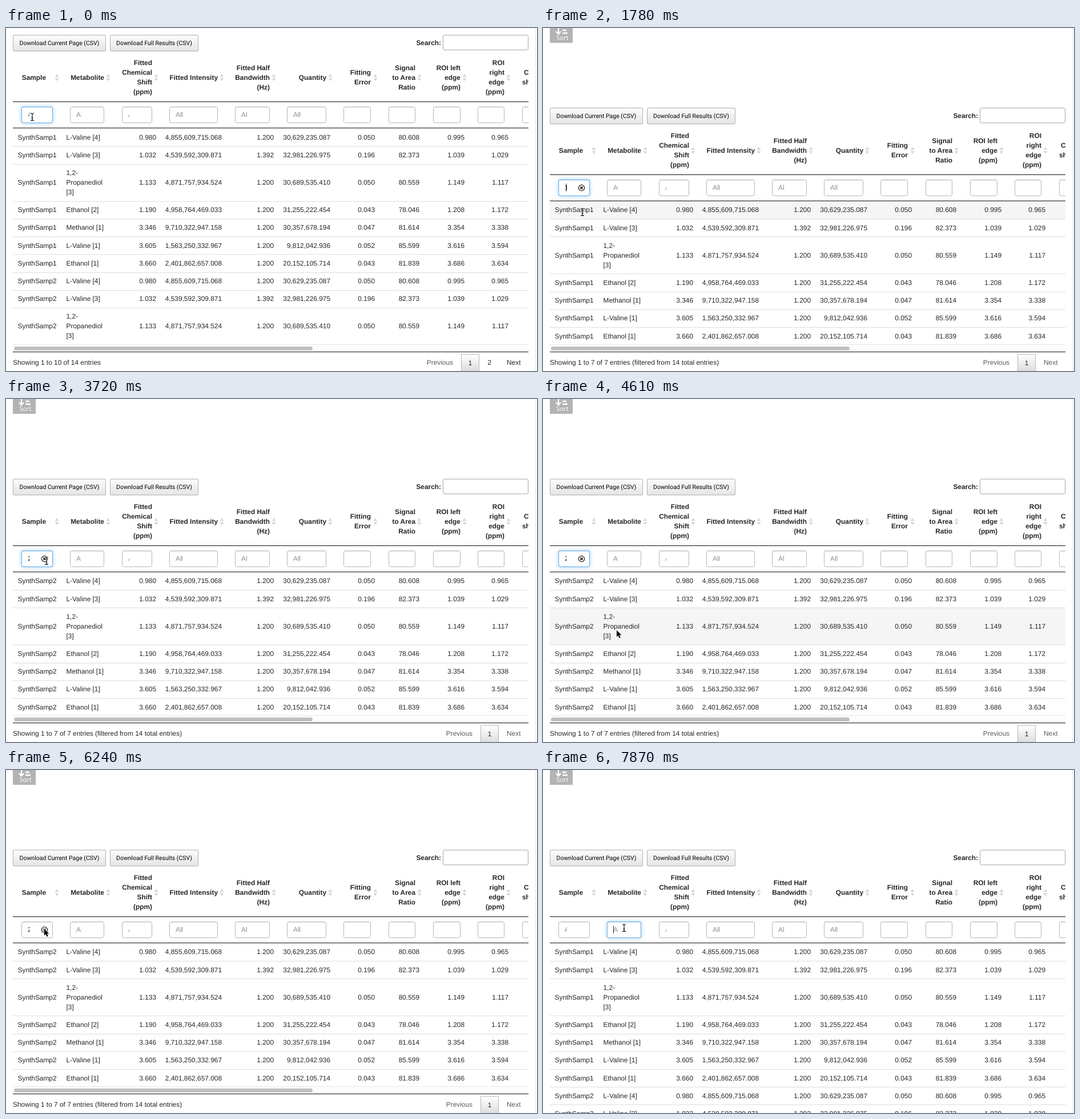
An HTML page for the animation above (8 s loop, 930 by 602 pixels).

```html
<!DOCTYPE html>
<html lang="en">
<head>
<meta charset="utf-8">
<title>Filtering a results table</title>
<style>
html, body { margin: 0; width: 100%; height: 100%; overflow: hidden; background: #fff; }
body { position: relative; font: 11.9px/17px "Liberation Sans", Arial, sans-serif; color: #262626;
  text-rendering: geometricPrecision; }
div, svg { position: absolute; box-sizing: border-box; }
#stage { left: 0; top: 0; width: 930px; height: 602px; overflow: hidden; }
#page { left: 0; top: 0; width: 930px; height: 900px; }
#edge { left: 927px; top: 0; width: 1px; height: 602px; background: #e6e6e6; }
.text { white-space: pre; }
.bold { font-weight: bold; }
.dim { color: #5a5a5a; }
#sort { left: 12px; top: -14px; width: 40px; height: 40px; background: #b3b3b3; }
#sort .text { font: 11px/17px "Open Sans", sans-serif; color: #fff; }
.button { top: 140px; height: 29px; border: 1px solid #b0b0b0; border-radius: 2px; color: #000;
  font: 10.5px/27px Roboto, sans-serif; text-align: center; white-space: nowrap;
  background: linear-gradient(#fcfcfc, #e5e5e5); }
.button.hover { border-color: #666; background: linear-gradient(#f5f5f5, #dfdfdf); }
#search { left: 765px; top: 140px; width: 150px; height: 27px; border: 1px solid #aaa; border-radius: 3px; }
#table { left: 12px; top: 0; width: 903px; height: 900px; overflow: hidden; }
#table > .shift { left: -12px; top: 0; width: 930px; height: 900px; }
.rule { left: 12px; width: 903px; height: 1px; background: #111; }
.field { top: 266px; height: 29px; border: 1px solid #b6b6b6; border-radius: 3.4px;
  box-shadow: inset 0 1px 1px rgba(0,0,0,.075); }
.field .value { left: 10px; top: 5px; height: 17px; overflow: hidden; color: #8e8e8e; }
.field .value.typed { color: #333; }
.glow { inset: -1px; border: 1px solid #66afe9; border-radius: 3.4px; box-shadow: 0 0 7px rgba(102,175,233,.6); }
.caret { top: 6px; width: 1px; height: 14px; background: #333; }
#rows { left: 0; top: 303.9px; width: 930px; }
.row { position: relative; left: 12px; width: 903px; border-top: 1px solid #ddd; }
.row.first { border-top-color: transparent; }
.row.hover { background: #f5f5f5; }
.row .text { margin-left: -12px; }
#foot { position: relative; height: 60px; }
#track { left: 12px; top: -1px; width: 903px; height: 13px; border-top: 1px solid #e8e8e8; background: #fdfdfd; }
#thumb { left: 14px; top: 2.6px; width: 523px; height: 7px; border-radius: 4px; background: #c1c1c1; }
#current { top: 15.6px; width: 32px; height: 32px; border: 1px solid #b5b5b5; border-radius: 2px;
  background: linear-gradient(#fff, #dcdcdc); text-align: center; line-height: 30px; }
#cursor { left: 0; top: 0; overflow: visible; width: 1px; height: 1px; }
</style>
</head>
<body>
<div id="stage">
  <div id="page">
    <div id="sort">
      <svg width="40" height="26" fill="none" stroke="#fff" stroke-width="2.300">
        <path d="M15 8V24M11 20L15 24.500L19 20M22 8H25M22 13H27M22 18H29M22 23H31"/>
      </svg>
    </div>
    <div class="button" id="download" style="left:12px;width:163px">Download Current Page (CSV)</div>
    <div class="button" style="left:182px;width:155px">Download Full Results (CSV)</div>
    <div id="search"></div>
    <div id="table"><div class="shift">
      <div class="rule" style="top:257px"></div>
      <div id="rows"><div id="foot">
        <div id="track"></div><div id="thumb"></div>
        <div class="rule" style="top:12px"></div>
        <div id="current">1</div>
      </div></div>
      <div class="rule" style="top:303px"></div>
    </div></div>
  </div>
  <div id="edge"></div>
  <svg id="cursor">
    <defs><path id="stem" d="M-3 -6.500Q0 -6.500 0 -4.500Q0 -6.500 3 -6.500M0 -4.500V4.500M-1.500 2H1.500M-3 6.500Q0 6.500 0 4.500Q0 6.500 3 6.500"/></defs>
    <g id="beam" fill="none">
      <use href="#stem" stroke="#fff" stroke-width="2.400"/>
      <use href="#stem" stroke="#000" stroke-width="1.100"/>
    </g>
    <path id="arrow" d="M0 0V11.500L2.700 9L4.600 13.400L6.700 12.500L4.800 8.200H8.400Z" fill="#000" stroke="#fff" stroke-width="1" paint-order="stroke"/>
    <g id="hand" fill="#fff" stroke="#000" stroke-width="1.1" stroke-linejoin="round">
      <path d="M-3 1V-6Q-3 -7.200 -2 -7.200Q-.8 -7.200 -.8 -6V-2Q.2 -3 1.400 -1.700Q2.600 -2.500 3.600 -1.100Q5.600 -1.600 5.600 .6V3Q5.400 5 4.400 7H-2.600Q-3.600 4.500 -6 1.800Q-6.300 .2 -4.600 .4Z"/>
      <path d="M-.8 -2V1M1.400 -1.700V1M3.600 -1V1.200" fill="none"/>
    </g>
  </svg>
</div>
<script>
const $ = id => document.getElementById(id);
const table = document.querySelector('.shift');

function box(parent, cls, style = {}, text = '') {
  const el = document.createElement('div');
  el.className = cls;
  el.textContent = text;
  Object.assign(el.style, style);
  parent.append(el);
  return el;
}

// Text centred vertically on y; x is its left or right edge.
function label(parent, text, x, y, cls = '', right = false) {
  const lines = text.split('\n').length;
  return box(parent, 'text ' + cls, {
    left: (right ? x - 200 : x) + 'px', width: right ? '200px' : 'auto',
    top: y - 8.5 * lines + 'px', textAlign: right ? 'right' : 'left'
  }, text);
}

function svg(parent, x, y, w, h, inner) {
  parent.insertAdjacentHTML('beforeend',
    `<svg style="left:${x}px;top:${y}px" width="${w}" height="${h}">${inner}</svg>`);
  return parent.lastElementChild;
}

// Header: title, left and right edge of the filter field, sort icon position
const columns = [
  ['Sample', 27, 82, 89, 70],
  ['Metabolite', 112, 172, 179],
  ['Fitted\nChemical\nShift\n(ppm)', 203, 256, 263],
  ['Fitted Intensity', 286, 371, 378],
  ['Fitted Half\nBandwidth\n(Hz)', 401, 462, 469],
  ['Quantity', 492, 561, 568],
  ['Fitting\nError', 591, 639, 647],
  ['Signal\nto Area\nRatio', 670, 717, 724],
  ['ROI left\nedge\n(ppm)', 748, 796, 803],
  ['ROI\nright\nedge\n(ppm)', 826, 873, 880],
  ['', 904, 960, 990]
];
const fields = columns.map(([title, left, right, icon, textEnd = right]) => {
  label(table, title, textEnd, 215, 'bold', true);
  svg(table, icon - 4, 208, 8, 14, '<path d="M.6 6L4 .8L7.400 6ZM.6 8L4 13.200L7.400 8Z" fill="#d6d6d6"/>');
  const field = box(table, 'field', { left: left + 'px', width: right - left + 'px' });
  const value = box(field, 'value', { width: Math.max(0, right - left - 51) + 'px' }, 'All');
  const glow = box(field, 'glow');
  const caret = box(field, 'caret', { left: '10px' });
  glow.style.opacity = 0;
  caret.hidden = true;
  return { field, value, glow, caret };
});
label(table, 'C', 907, 206.5, 'bold');
label(table, 'sh', 904, 223.5, 'bold');
label($('page'), 'Search:', 762, 154, 'bold', true);
label($('sort'), 'Sort', 11.5, 31.5);
const clear = svg(fields[0].field, 33, 7, 13, 13,
  '<g fill="none" stroke="#222" stroke-width="1.3"><circle cx="6.500" cy="6.500" r="5.100"/><path stroke-width="1.700" d="M4.400 4.400L8.600 8.600M8.600 4.400L4.400 8.600"/></g>');

const data = [
  'L-Valine [4]|0.980|4,855,609,715.068|1.200|30,629,235.087|0.050|80.608|0.995|0.965',
  'L-Valine [3]|1.032|4,539,592,309.871|1.392|32,981,226.975|0.196|82.373|1.039|1.029',
  '1,2-\nPropanediol\n[3]|1.133|4,871,757,934.524|1.200|30,689,535.410|0.050|80.559|1.149|1.117',
  'Ethanol [2]|1.190|4,958,764,469.033|1.200|31,255,222.454|0.043|78.046|1.208|1.172',
  'Methanol [1]|3.346|9,710,322,947.158|1.200|30,357,678.194|0.047|81.614|3.354|3.338',
  'L-Valine [1]|3.605|1,563,250,332.967|1.200|9,812,042.936|0.052|85.599|3.616|3.594',
  'Ethanol [1]|3.660|2,401,862,657.008|1.200|20,152,105.714|0.043|81.839|3.686|3.634'
];
const ends = [263, 378, 469, 568, 646, 724, 803, 880];
const rows = [1, 2].flatMap(sample => data.map(line => {
  const [name, ...numbers] = line.split('|');
  const height = name.includes('\n') ? 65.2 : 31.2;
  const el = box($('rows'), 'row', { height: height + 'px' });
  const mid = height / 2 - 0.6;
  label(el, 'SynthSamp' + sample, 20.5, mid);
  label(el, name, 105.5, mid);
  numbers.forEach((n, i) => label(el, n, ends[i], mid, '', true));
  return { el, height, sample };
}));
$('rows').append($('foot'));

const info = label($('foot'), '', 12, 31);
const previous = label($('foot'), 'Previous', 783, 31.5, 'dim', true);
const second = label($('foot'), '2', 843.5, 31.5);
const next = label($('foot'), 'Next', 877, 31.5);

// Tracks: each entry holds from its time until the next one.
const cursorTrack = [
  [0, 'beam', 46, 156], [440, 'hand', 47, 163], [1040, 'arrow', 47, 236],
  [1190, 'beam', 51, 399], [1340, 'beam', 57, 510], [1480, 'beam', 62, 479],
  [1630, 'beam', 67, 399], [1780, 'beam', 69, 323], [1930, 'arrow', 68, 290],
  [2080, 'arrow', 67, 279], [2520, 'beam', 67, 280], [3720, 'beam', 71, 284],
  [3870, 'arrow', 82, 301], [4020, 'arrow', 96, 335], [4160, 'arrow', 110, 368],
  [4310, 'arrow', 121, 390], [4460, 'arrow', 127, 402], [4610, 'arrow', 129, 406],
  [4750, 'arrow', 112, 371], [4900, 'arrow', 78, 301], [5050, 'arrow', 67, 279],
  [6380, 'beam', 67, 280], [6680, 'arrow', 92, 287], [6830, 'arrow', 150, 298],
  [6980, 'arrow', 205, 303], [7130, 'arrow', 211, 302], [7280, 'arrow', 190, 292],
  [7430, 'beam', 157, 281], [7570, 'beam', 142, 277]
];
const filterTrack = [[0, ''], [440, '1'], [2670, ''], [3720, '2'], [6380, '']];
const typedTrack = [[0, ''], [440, '1'], [2670, ''], [3570, '2'], [6380, '']];
const glowTrack = [
  [0, 1, 0], [2380, .5, 0], [2520, 0, 0], [2820, .6, 0], [2970, 1, 0],
  [6080, .5, 0], [6240, 0, 0], [6530, .6, 0], [6680, 1, 0], [7720, .4, .5], [7870, 0, 1]
];
// Caret: field index and offset inside it, or -1 for none
const caretTrack = [
  [0, -1, 0], [440, 0, 12], [2520, -1, 0], [2670, 0, 10], [3270, -1, 0],
  [6380, 0, 10], [6980, -1, 0], [7720, 1, 10]
];
const at = (track, t) => track.findLast(entry => entry[0] <= t).slice(1);

function showTable(filter, pointerY) {
  const visible = filter ? rows.filter(r => r.sample == filter) : rows.slice(0, 10);
  let top = 303.9;
  for (const row of rows) {
    const on = visible.includes(row);
    row.el.style.display = on ? '' : 'none';
    if (!on) continue;
    row.el.classList.toggle('first', row === visible[0]);
    row.el.classList.toggle('hover', pointerY >= top && pointerY < top + row.height);
    top += row.height;
  }
  info.textContent = filter ? 'Showing 1 to 7 of 7 entries (filtered from 14 total entries)'
    : 'Showing 1 to 10 of 14 entries';
  previous.style.left = (filter ? 617 : 583) + 'px';
  $('current').style.left = (filter ? 831 : 797) + 'px';
  second.style.display = filter ? 'none' : '';
  next.classList.toggle('dim', !!filter);
}

function draw(now) {
  const t = now % 8000;
  const scroll = t < 440 ? 127.7 : 0;
  const [shape, x, y] = at(cursorTrack, t);
  const [typed] = at(typedTrack, t);
  const [caretField, caretX] = at(caretTrack, t);
  const glows = at(glowTrack, t);

  $('page').style.top = -scroll + 'px';
  showTable(at(filterTrack, t)[0], y + scroll);
  $('download').classList.toggle('hover', shape === 'hand');

  fields[0].value.textContent = typed || 'All';
  fields[0].value.classList.toggle('typed', !!typed);
  clear.style.display = typed ? '' : 'none';
  fields.slice(0, 2).forEach(({ glow, caret }, i) => {
    glow.style.opacity = glows[i];
    caret.hidden = caretField !== i;
    caret.style.left = caretX + 'px';
  });

  for (const id of ['beam', 'arrow', 'hand']) $(id).style.display = id === shape ? '' : 'none';
  $('cursor').style.transform = `translate(${x}px, ${y}px)`;
  requestAnimationFrame(draw);
}
draw(0);
</script>
</body>
</html>
```
